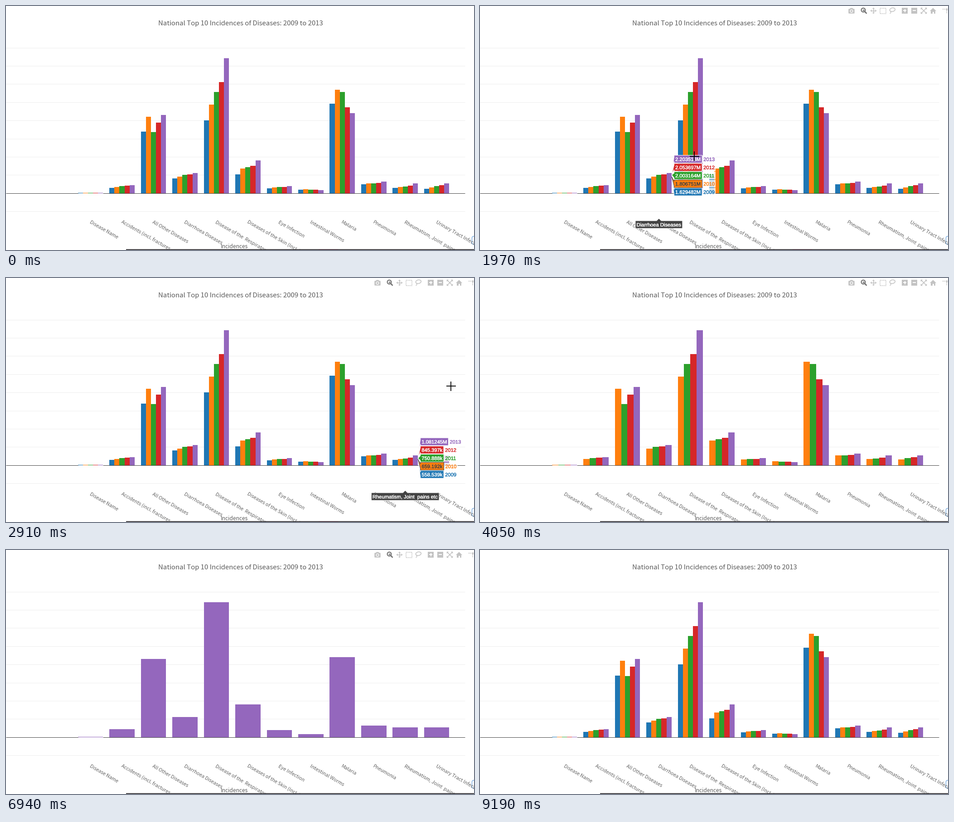
These frames come from a looping animation (1033 by 542 pixels, 9.52 s). A matplotlib script:

```python
import numpy as np
import matplotlib.pyplot as plt
from matplotlib.animation import FuncAnimation
from matplotlib.collections import PolyCollection
from matplotlib.patches import Circle, Ellipse, FancyBboxPatch, Polygon, Rectangle
from matplotlib.patheffects import withStroke

W, H, DPI = 1033, 542, 64
LOOP, STEP = 9520, 40
PT = 72 / DPI

COLORS = ["#1f77b4", "#ff7f0e", "#2ca02c", "#d62728", "#9467bd"]
YEARS = [2009, 2010, 2011, 2012, 2013]
DARK, SOFT, GRID, ICON = "#444444", "#5c5c5c", "#eeeeee", "#c3c3c3"

# Thousands of cases per year, 2009 to 2013
DATA = {
    "Disease Name": [0, 0, 0, 0, 0],
    "Accidents (incl. fractures , burns etc)": [571.204, 689.517, 765.338, 818.946, 898.127],
    "All Other Diseases": [6743.281, 8424.618, 6694.357, 7774.932, 8615.746],
    "Diarrhoea Diseases": [1629.482, 1806.751, 2003.164, 2053.697, 2203.518],
    "Disease of the  Respiratory System": [8017.565, 9760.371, 11098.93, 12215.99, 14823.86],
    "Diseases of the Skin (Incl. Ulcers)": [2084.319, 2702.846, 2869.175, 3022.483, 3615.762],
    "Eye Infection": [546.813, 622.947, 668.251, 691.738, 762.496],
    "Intestinal Worms": [387.066, 419.298, 374.886, 357.844, 349.632],
    "Malaria": [9825.614, 11378.52, 11142.87, 9431.268, 8801.943],
    "Pneumonia": [994.275, 1063.418, 1087.936, 1136.524, 1264.817],
    "Rheumatism, Joint  pains etc": [558.539, 659.192, 750.888, 845.397, 1081.245],
    "Urinary Tract Infection": [497.326, 622.184, 764.951, 889.473, 1074.628],
}
NAMES = list(DATA)
VALUES = np.array(list(DATA.values()))

Y0, PITCH, PER_PX = 415.7, 40.4, 49.5
X0, CAT_W, GROUP_W = 186.5, 69.47, 55.6
LABEL_GAP, LABEL_H, ARROW, PAD = 18.2, 17, 5.2, 2.6

TOGGLES, RESTORE = (4050, 5060, 6020, 6940), 7950

# Pointer waypoints: time, x, y
PATH = np.array([
    (450, 1015, 330), (650, 715, 345), (850, 485, 254), (1020, 359, 259),
    (1390, 292, 317), (1440, 292, 317), (1510, 316, 325), (1710, 316, 325),
    (1950, 448, 327), (2190, 650, 379), (2380, 663, 382), (2640, 845, 300),
    (2710, 850, 298), (2900, 982, 240), (3100, 1016, 181), (3180, 1016, 181),
    (8150, 1022, 130), (8300, 935, 153), (8560, 640, 320), (8800, 330, 440),
    (9070, 110, 528),
])
LAG = 160

fig = plt.figure(figsize=(W / DPI, H / DPI), dpi=DPI, facecolor="white")
ax = fig.add_axes([0, 0, 1, 1])
ax.set_xlim(0, W)
ax.set_ylim(H, 0)
ax.axis("off")


def text(x, y, s, size, color=SOFT, font="Noto Sans CJK JP", **kw):
    return ax.text(x, y, s, fontsize=size * PT, color=color, family=font, **kw)


def hover_text(x, y, s, color, **kw):
    t = text(x, y, s, 11.2, color, "Liberation Sans", va="center_baseline", zorder=10, **kw)
    t.set_path_effects([withStroke(linewidth=0.35, foreground=color)])
    return t


def line(xs, ys, color, width=1, **kw):
    return ax.plot(xs, ys, color=color, lw=width * PT,
                   solid_capstyle="butt", dash_capstyle="butt", **kw)[0]


def patch(shape):
    return ax.add_patch(shape)


def draw_frame():
    for k in range(-1, 9):
        if k:
            line([0, 1013], [Y0 - k * PITCH] * 2, GRID, zorder=1)
    # the empty first category interrupts the axis
    gap = X0 - GROUP_W / 2, X0 + GROUP_W / 2
    line([0, gap[0]], [Y0] * 2, DARK, zorder=3)
    line([gap[1], 1013], [Y0] * 2, DARK, zorder=3)
    text(517.5, 42.5, "National Top 10 Incidences of Diseases: 2009 to 2013", 14.9, ha="center")
    text(504, 537.5, "Incidences", 12, ha="center", zorder=5)
    for k, name in enumerate(NAMES):
        text(X0 + k * CAT_W - 3, 482, name, 10.8, "#666666", rotation=-30,
             rotation_mode="anchor", ha="left", va="baseline", zorder=4)
    patch(Rectangle((0, 541), W, 1, color="white", zorder=6))
    line([0, 265], [541.5] * 2, "#b4b4b4", zorder=7)
    line([265, W], [541.2] * 2, "#1c1a1e", 1.6, zorder=7)
    patch(FancyBboxPatch((1033, 516), 10, 9, boxstyle="round,pad=4.5,rounding_size=4",
                         fc="white", ec="#4a90d9", lw=PT, zorder=3))


def draw_toolbar():
    """Plot buttons along the top edge; returns every artist in it."""
    parts = []

    def add_line(xs, ys, color=ICON, width=1.6, **kw):
        parts.append(line(xs, ys, color, width, **kw))

    def add(shape):
        parts.append(patch(shape))

    def fill(points, color=ICON):
        add(Polygon(points, fc=color, ec="none"))

    # camera
    add(FancyBboxPatch((814.5, 7.5), 11, 8, boxstyle="round,pad=1.2", fc=ICON, ec="none"))
    fill([(816, 7), (817.5, 4.5), (822.5, 4.5), (824, 7)])
    add(Circle((820, 11.3), 3.6, fc="white", ec="none", zorder=2))
    add(Circle((820, 11.3), 2.2, fc=ICON, ec="none", zorder=2))
    # zoom, active
    on = "#6e6e6e"
    add(Circle((846, 9), 4.4, fc="none", ec=on, lw=2 * PT))
    add_line([849.3, 853.5], [12.3, 16.8], on, 2.6)
    add_line([843.5, 848.5], [9, 9], on, 1.3)
    add_line([846, 846], [6.5, 11.5], on, 1.3)
    # pan
    add_line([863, 874], [10.5, 10.5])
    add_line([868.5, 868.5], [5, 16])
    for dx, dy in ((1, 0), (-1, 0), (0, 1), (0, -1)):
        tip = np.array([868.5 + 7 * dx, 10.5 + 7 * dy])
        back = tip - 3 * np.array([dx, dy])
        side = 2.8 * np.array([dy, dx])
        fill([tip, back + side, back - side])
    # box select
    add_line([882.5, 895.5, 895.5, 882.5, 882.5], [4.5, 4.5, 16.5, 16.5, 4.5],
             dashes=(1.3, 0.9))
    # lasso
    add(Ellipse((910.3, 8.3), 12, 8, angle=-12, fc="none", ec=ICON, lw=1.6 * PT))
    add_line([905.5, 907.2, 906.3, 904.5], [11, 13, 15.5, 16.8], width=1.4)
    # zoom in and out
    for x in (937.5, 958.5):
        add(Rectangle((x - 6.3, 4), 12.6, 12.6, fc=ICON, ec="none"))
        add_line([x - 3.8, x + 3.8], [10.3, 10.3], "white", 2, zorder=3)
    add_line([937.5, 937.5], [6.5, 14.1], "white", 2, zorder=3)
    # autoscale
    add_line([974, 985], [5, 16])
    add_line([974, 985], [16, 5])
    for sx in (-1, 1):
        for sy in (-1, 1):
            x, y = 979.5 + 6.8 * sx, 10.5 + 6.8 * sy
            fill([(x, y), (x - 4.5 * sx, y), (x, y - 4.5 * sy)])
    # home
    fill([(993, 11), (1000, 4.3), (1007, 11)])
    fill([(995, 10.5), (1005, 10.5), (1005, 16.5), (1001.5, 16.5),
          (1001.5, 12.5), (998.5, 12.5), (998.5, 16.5), (995, 16.5)])
    # spike lines
    add_line([1021, 1029], [6.5, 6.5], width=1.8, dashes=(1.2, 0.8))
    add_line([1030, 1030], [4.5, 8.5], width=3)
    add_line([1030, 1030], [10, 17], width=1.8, dashes=(1.2, 0.8))
    return parts


def short(v):
    return f"{v / 1000:.7g}M" if v >= 1000 else f"{v:.6g}k"


def spread(ys):
    """Push overlapping labels apart, keeping their mean height."""
    order = np.argsort(ys, kind="stable")
    pos = np.array(ys, float)[order]
    for _ in range(200):
        for k in range(len(pos) - 1):
            push = (LABEL_GAP - pos[k + 1] + pos[k]) / 2
            if push > 0:
                pos[k] -= push
                pos[k + 1] += push
    out = np.empty_like(pos)
    out[order] = pos
    return out


def width_of(t):
    return t.get_window_extent(fig.canvas.get_renderer()).width


class Tag:
    """Hover label of one series."""

    def __init__(self, k):
        edge = ink = DARK if k == 1 else "white"
        self.back = patch(Rectangle((0, 0), 30, LABEL_H, fc="white", ec="none", alpha=0.8, zorder=8))
        self.box = patch(Polygon([(0, 0)] * 3, fc=COLORS[k], ec=edge, lw=PT, zorder=9))
        self.value = hover_text(0, 0, "", ink)
        self.year = hover_text(0, 0, str(YEARS[k]), COLORS[k])
        self.parts = [self.back, self.box, self.value, self.year]

    def place(self, x, y, cy, label):
        self.value.set_text(label)
        left, half = x + ARROW, LABEL_H / 2
        right = left + width_of(self.value) + 2 * PAD
        self.box.set_xy([(x, y), (left, cy + ARROW), (left, cy + half), (right, cy + half),
                         (right, cy - half), (left, cy - half), (left, cy - ARROW)])
        self.value.set_position((left + PAD, cy + 0.3))
        self.year.set_position((right + 3, cy + 0.3))
        self.back.set_xy((right, cy - half))


class Tip:
    """Category label under the axis."""

    def __init__(self):
        self.box = patch(Polygon([(0, 0)] * 3, fc=DARK, ec="white", lw=PT, zorder=9))
        self.label = hover_text(0, 485.8, "", "white", ha="center")
        self.parts = [self.box, self.label]

    def place(self, x, name):
        self.label.set_text(name)
        self.label.set_x(x)
        half = width_of(self.label) / 2 + PAD
        top, low = 477, 494
        self.box.set_xy([(x, top - ARROW), (x + ARROW, top), (x + half, top), (x + half, low),
                         (x - half, low), (x - half, top), (x - ARROW, top)])


def show(parts, on):
    for p in parts:
        p.set_visible(on)


def pointer(t):
    return np.interp(t, PATH[:, 0], PATH[:, 1]), np.interp(t, PATH[:, 0], PATH[:, 2])


def set_bars(hidden):
    bw = GROUP_W / (5 - hidden)
    for k, coll in enumerate(bars):
        coll.set_visible(k >= hidden)
        verts = []
        for c, v in enumerate(VALUES[:, k]):
            x = X0 + c * CAT_W - GROUP_W / 2 + (k - hidden) * bw
            top = Y0 - max(v / PER_PX, 0.5)
            verts.append([(x, Y0), (x, top), (x + bw, top), (x + bw, Y0)])
        coll.set_verts(verts)


def set_hover(cat):
    show(hover_parts, cat is not None)
    if cat is None:
        return
    cx = X0 + cat * CAT_W
    ys = Y0 - VALUES[cat] / PER_PX
    for tag, y, cy, v in zip(tags, ys, spread(ys), VALUES[cat]):
        tag.place(cx + GROUP_W / 2 + 0.5, y, cy, short(v))
    tip.place(cx, NAMES[cat])


def update(i):
    t = i * STEP + STEP / 2
    set_bars(0 if t >= RESTORE else sum(t >= c for c in TOGGLES))

    show(toolbar, 450 <= t < 9070)
    show([seam], t < 3700)

    inside = 450 <= t < 3180 or 8150 <= t < 9070
    x, y = pointer(t)
    show(cross, inside)
    cross[0].set_data([x - 10.5, x + 10.5], [y, y])
    cross[1].set_data([x, x], [y - 10.5, y + 10.5])

    hovering = 520 <= t < 2980 or 8310 <= t < 8900
    cat = None
    if hovering:
        px = pointer(t - LAG)[0]
        cat = int(np.clip(round((px - X0) / CAT_W), 1, len(NAMES) - 1))
    set_hover(cat)
    return []


draw_frame()
toolbar = draw_toolbar()
seam = line([690, 733], [541.2] * 2, "#4d3a44", 1.6, zorder=8)
bars = [ax.add_collection(PolyCollection([], facecolors=c, edgecolors="none", zorder=2),
                          autolim=False) for c in COLORS]
tags = [Tag(k) for k in range(5)]
tip = Tip()
hover_parts = tip.parts + [p for tag in tags for p in tag.parts]
cross = [line([0, 0], [0, 0], "black", 1.8, zorder=12) for _ in range(2)]

ax.set_xlim(0, W)
ax.set_ylim(H, 0)

anim = FuncAnimation(fig, update, frames=LOOP // STEP, interval=STEP,
                     init_func=lambda: update(0), repeat=True, repeat_delay=0)
plt.show()
```
